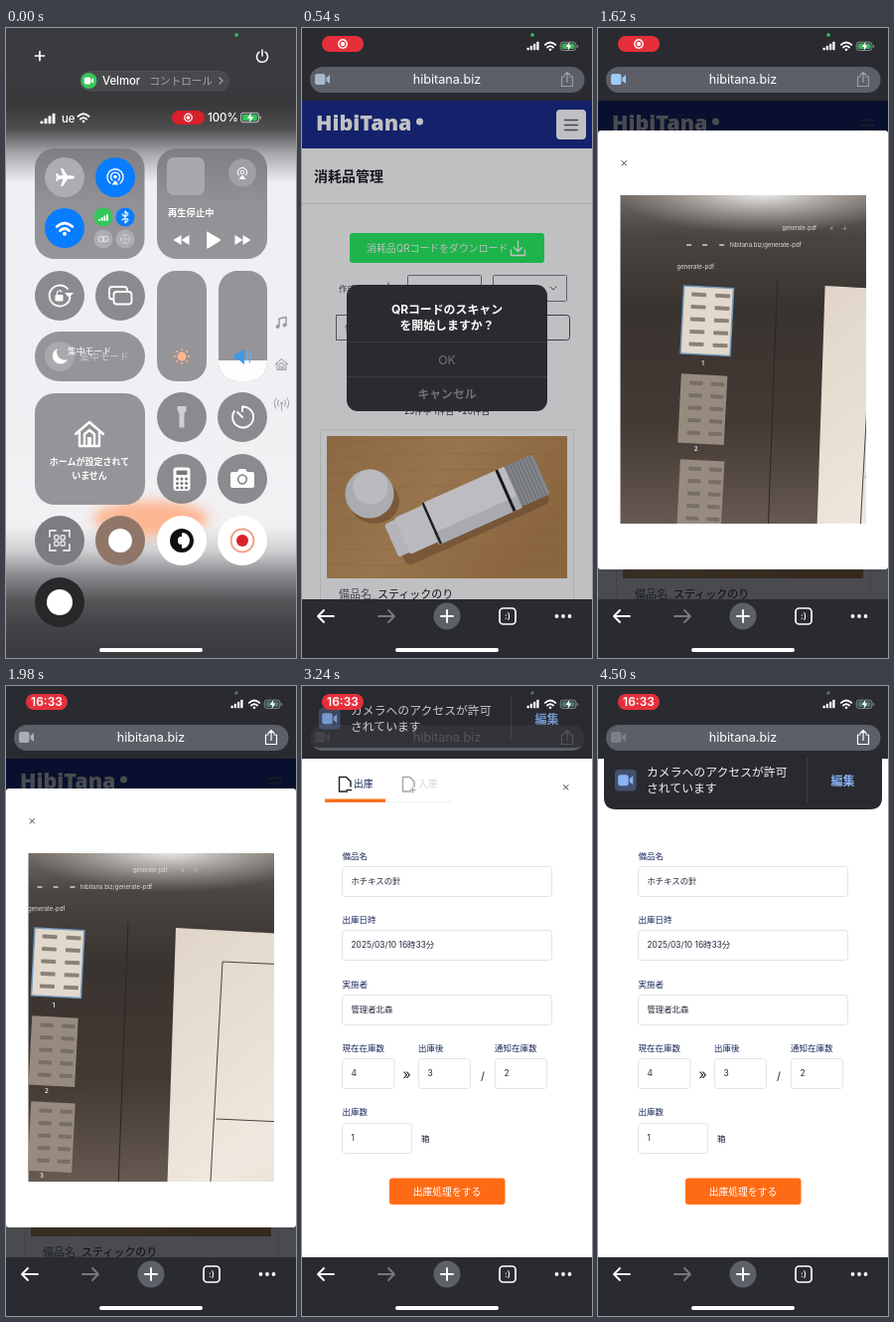
An HTML page that plays this animation: 292 by 633 pixels, repeating every 4590 ms.

```html
<!DOCTYPE html>
<html lang="ja">
<head>
<meta charset="utf-8">
<title>Stock scan demo</title>
<style>
html, body { margin: 0; width: 100%; height: 100%; overflow: hidden; background: #2a2b30; }
svg { display: block; width: 292px; height: 633px; }
text { font-family: Inter, 'Noto Sans CJK JP', 'Noto Sans CJK', sans-serif; white-space: pre; }
</style>
</head>
<body>
<svg id="stage" viewBox="0 0 292 633" xmlns="http://www.w3.org/2000/svg"></svg>
<script>
const LOOP = 4590, STEP = 90;
const BAR = '#2a2b30', NAVY = '#1c2a5e', BLUE = '#8ab4f8', INK = '#22262e';

// Markup helpers
const rect = (x, y, w, h, fill, r = 0, more = '') =>
  `<rect x="${x}" y="${y}" width="${w}" height="${h}" rx="${r}" fill="${fill}" ${more}/>`;
const box = (x, y, w, h, stroke, r = 0, fill = '#fff', sw = 1) =>
  rect(x + .5, y + .5, w - 1, h - 1, fill, r, `stroke="${stroke}" stroke-width="${sw}"`);
const disc = (x, y, r, fill, more = '') => `<circle cx="${x}" cy="${y}" r="${r}" fill="${fill}" ${more}/>`;
const ring = (x, y, r, stroke, w) => disc(x, y, r, 'none', `stroke="${stroke}" stroke-width="${w}"`);
const shape = (d, fill, more = '') => `<path d="${d}" fill="${fill}" ${more}/>`;
const line = (d, stroke, w = 1, more = '') =>
  `<path d="${d}" fill="none" stroke="${stroke}" stroke-width="${w}" stroke-linecap="round" stroke-linejoin="round" ${more}/>`;
const text = (s, x, y, size, fill, weight = 400, anchor = 'start') =>
  `<text x="${x}" y="${y}" font-size="${size}" fill="${fill}" font-weight="${weight}" text-anchor="${anchor}">${s}</text>`;
const mid = (s, x, y, size, fill, weight) => text(s, x, y, size, fill, weight, 'middle');
const group = (id, inner, more = '') => `<g id="${id}" ${more}>${inner}</g>`;
const at = (x, y, s, inner) => `<g transform="translate(${x} ${y}) scale(${s})">${inner}</g>`;
const stops = list => list.map(([o, c, a = 1]) => `<stop offset="${o}" stop-color="${c}" stop-opacity="${a}"/>`).join('');
const grad = (id, list, dir = 'x2="0" y2="1"') => `<linearGradient id="${id}" ${dir}>${stops(list)}</linearGradient>`;

// Small icons, centred on 0,0
const video = fill => rect(-7.5, -5.5, 10.5, 11, fill, 2.5) + shape('M4 -1.5L7.5 -4.5V4.5L4 1.5Z', fill);
const wifi = (c, w = 1.8) => line('M-5.2 -1.6Q0 -6.3 5.2 -1.6M-3 1Q0 -1.7 3 1', c, w) + disc(0, 3.2, 1.3, c);
const bars = c => [0, 1, 2, 3].map(i => rect(-6.5 + i * 3.5, 2.5 - i * 2.2, 2.5, 2.5 + i * 2.2, c, .7)).join('');
const bolt = shape('M1 -5L-3 .8H-.3L-1 5L3 -.8H.3Z', '#fff');
const battery = (c, edge) => rect(-9, -4.5, 17, 9, 'none', 2.5, `stroke="${edge}"`) +
  rect(-7.5, -3, 14, 6, c, 1.3) + rect(9, -1.5, 1.3, 3, edge, .6) + bolt;
const recMark = ring(0, 0, 4.2, '#fff', 1.4) + disc(0, 0, 2.2, '#fff');
const house = (c, w) => line('M-14 0L0 -12L14 0M-10 -2V12H10V-2M-5 12V0L0 -4L5 0V12', c, w) + rect(-2, 3, 4, 9, c);
const chevron = (x, y) => line(`M${x - 3} ${y - 1.5}l3 3l3 -3`, '#555b66');
const scanIcon = (c, s) => [[-1, -1], [1, -1], [-1, 1], [1, 1]]
  .map(([x, y]) => rect(x * s - s * .65, y * s - s * .65, s * 1.3, s * 1.3, 'none', 1, `stroke="${c}" stroke-width="1.5"`)).join('');

function defs() {
  return '<defs>' +
    grad('ccBack', [[0, '#3a3a3e'], [.08, '#3c3c40'], [.12, '#38383b'], [.16, '#4e4e51'], [.2, '#a9a8ac'],
      [.245, '#efeef2'], [.79, '#f1f0f3'], [.83, '#cfced1'], [.87, '#88878b'], [.91, '#555558'], [.95, '#444448'], [1, '#3a3a3e']]) +
    grad('topTile', [[0, '#7f7e82'], [.5, '#929195'], [1, '#959498']]) +
    grad('wood', [[0, '#b98a55'], [.5, '#c99a63'], [1, '#b78650']], 'x2="1" y2=".4"') +
    grad('desk', [[0, '#6e6762'], [.12, '#4a4542'], [.35, '#39332f'], [.7, '#443a34'], [1, '#665a52']]) +
    grad('paper', [[0, '#dfd4c6'], [.4, '#efe8de'], [1, '#d8ccbc']], 'x2=".6" y2="1"') +
    `<radialGradient id="glare">${stops([[0, '#fff', .9], [.45, '#e9e5e1', .5], [1, '#cfc8c2', 0]])}</radialGradient>` +
    '<filter id="soft" x="-50%" y="-100%" width="200%" height="300%"><feGaussianBlur stdDeviation="6"/></filter>' +
    '<filter id="haze"><feGaussianBlur stdDeviation=".5"/></filter>' +
    '<clipPath id="web"><rect y="73" width="292" height="501"/></clipPath>' +
    '<clipPath id="lens"><rect x="22.5" y="168" width="247.5" height="330"/></clipPath>' +
    '<clipPath id="vol"><rect x="214" y="244" width="49" height="111" rx="19"/></clipPath></defs>';
}

function photo() {
  const ribs = Array.from({ length: 8 }, (_, i) => rect(54 + i * 3.5, -22, 1, 44, '#8b8f96')).join('');
  const grain = Array.from({ length: 9 }, (_, i) =>
    line(`M25 ${418 + i * 15}Q110 ${408 + i * 17} 267 ${414 + i * 15}`, '#a97a47', .7, 'opacity=".45"')).join('');
  return rect(25, 410, 242, 143, 'url(#wood)') + grain +
    `<ellipse cx="73" cy="476" rx="25" ry="22" fill="#7d5733" opacity=".5"/>` +
    disc(68, 468, 24.5, '#e3e4e8') + disc(69, 461, 17.5, '#f8f8fa') +
    `<g transform="translate(165 482) rotate(-24)">` +
    rect(-78, 8, 158, 22, '#7d5733', 6, 'opacity=".5"') +
    rect(-82, -18, 16, 36, '#eeeff2', 3) + rect(-70, -20, 32, 40, '#f8f8fa', 2) +
    rect(-40, -22, 92, 45, '#fbfbfd', 2) + rect(-40, 10, 92, 13, '#dfe1e6') +
    rect(-39, -22, 2.5, 45, '#25272b') + rect(42, -22, 3, 45, '#1c1e22') +
    rect(52, -22, 31, 44, '#aeb1b7', 3) + ribs + '</g>';
}

function listPage() {
  const select = (x, s) => box(x, 248, 75, 27, '#7a7f89', 1) + text(s, x + 10, 265, 8.5, INK) + chevron(x + 61, 261.5);
  return rect(0, 73, 292, 501, '#fff') + rect(0, 73, 292, 48, '#182c8b') +
    `<text x="14" y="103" font-size="21.5" font-weight="800" fill="#fff" style="font-family:'Open Sans',sans-serif">HibiTana</text>` +
    disc(118.5, 94, 3.5, '#fff') + group('menu', rect(256, 82, 30, 30, '#fff', 4)) +
    line('M264.500 92.500H277.500M264.500 97.500H277.500M264.500 102.500H277.500', '#5a5d66', 1.3) +
    text('消耗品管理', 12, 154, 14, '#1b1d22', 700) + rect(0, 176, 292, 1, '#dcdde0') +
    rect(48, 206, 196, 30, '#27ee60', 3) + text('消耗品QRコードをダウンロード', 65, 225, 9.9, '#fff') +
    line('M217.500 214V224M213.500 220.500L217.500 224.500L221.500 220.500M210.500 223V228.500H224.500V223', '#fff', 1.3) +
    text('作成日降順', 37, 265, 8.5, '#444953') + line('M87 256V267.500M83.500 264L87 267.500L90.500 264', '#444953') +
    select(106, '利用場所') + select(192, '保管場所') +
    box(34, 288, 127, 26, '#6c717b') + text('備品名で検索', 43, 304.5, 9.8, '#757a84') +
    at(146.5, 301, 1, scanIcon('#33363d', 4.2)) +
    rect(160, 288, 26, 26, '#9dcdfb') + ring(172, 300, 4, '#fff', 1.2) + line('M175 303L178 306', '#fff', 1.2) +
    box(198, 288, 72, 26, '#4a5160', 3) + mid('クリア', 234, 304, 8.5, INK) +
    box(93, 339, 29, 30, '#f0f1f3', 2) + mid('« 前', 107.500, 357, 8.5, '#9a9ea6') +
    rect(126, 339, 15.500, 30, '#1d43d6', 2) + mid('1', 133.700, 357, 8.5, '#fff') +
    box(146, 339, 17, 30, '#f0f1f3', 2) + mid('2', 154.500, 357, 8.5, INK) +
    box(167, 339, 28, 30, '#f0f1f3', 2) + mid('次 »', 181, 357, 8.5, INK) +
    mid('25件中 1件目〜20件目', 146, 387.500, 8.5, INK) +
    box(18, 403, 256, 190, '#e6e7ea') + photo() +
    text('備品名', 37, 573, 11, '#5a5d66') + rect(70, 573, 6, 1, '#ccc') + text('スティックのり', 76, 573, 11, '#1b1d22');
}

function alertBox() {
  return rect(45, 258, 202, 127, BAR, 11) +
    mid('QRコードのスキャン', 146, 287, 11.9, '#fff', 700) + mid('を開始しますか？', 146, 303, 11.9, '#fff', 700) +
    rect(45, 315, 202, .7, '#42444a') + rect(45, 350, 202, .7, '#42444a') +
    group('choices', mid('OK', 146, 337.500, 12.3, 'currentColor') + mid('キャンセル', 146, 372, 11.8, 'currentColor', 700));
}

function thumb(x, y, w, h, fill, edge) {
  const rows = Array.from({ length: 10 }, (_, i) =>
    rect(x + 8 + (i % 2) * w * .48, y + 6 + (i >> 1) * 12.5, w * .3, 4, '#6d645c', 1, 'opacity=".75"')).join('');
  return `<g transform="rotate(3 ${x} ${y})">` + rect(x, y, w, h, fill, 0, `stroke="${edge}" stroke-width="1.5"`) + rows + '</g>';
}

// The filmed desk; at zero offset the sheet stands fully in view
function scene() {
  const label = (s, x, y) => `<g transform="rotate(2 ${x} ${y})">${text(s, x, y, 8.2, '#3c3a3a', 700)}</g>`;
  return shape('M70 218L470 240V760H52Z', 'url(#paper)') +
    line('M470 268L117 252L98 600M111 410L470 426', '#4a443f', 1) +
    label('管理IDCO-4538', 220, 303) + label('備品名 ホチキスの針', 219, 323) + label('カテゴリ消耗品', 218, 343) +
    label('管理IDCO-6493', 210, 457) + label('備品名 ボールペン', 208, 475) + label('カテゴリ消耗品', 207, 491) +
    line('M22 213L12 480', '#2c2521', 1) +
    thumb(-72, 218, 50, 68, '#e2d9cc', '#6f97bd') + thumb(-74, 307, 45, 68, '#978b80', '#978b80') +
    thumb(-75, 393, 43, 68, '#978b80', '#978b80') +
    `<g filter="url(#haze)">` + mid('1', -53, 298, 6, '#ddd', 700) + mid('2', -60, 384, 6, '#ddd', 700) + mid('3', -65, 469, 6, '#ddd', 700) + '</g>' +
    group('tabs', text('generate-pdf', -79, 201, 6, '#e4ddd6') + text('hibitana.biz/generate-pdf', -26, 179, 6, '#e4ddd6') +
      text('generate-pdf', 27, 162, 5.5, '#e4ddd6') + text('× 　 ＋', 75, 162, 5.5, '#d8d0c8') +
      line('M-69 177h4M-53 177h4M-36 177h4', '#d8d0c8', 1.5), 'filter="url(#haze)"');
}

function scanner() {
  return rect(0, 73, 292, 501, '#04060c', 0, 'opacity=".72"') + rect(0, 103, 292, 441, '#fff', 3) +
    line('M24 133.500l4.500 4.500m0 -4.500l-4.500 4.500', '#333', .9) +
    `<g clip-path="url(#lens)">` + rect(22, 168, 249, 330, 'url(#desk)') +
    `<ellipse cx="165" cy="165" rx="150" ry="42" fill="url(#glare)"/>` + group('scene', scene()) +
    group('crumb', text('e-pdf', 23, 178, 6, '#cfc6bd')) + '</g>';
}

function form() {
  const field = (x, y, w, s) => box(x, y, w, 31, '#e2e4ea', 3) + text(s, x + 9.500, y + 18.300, 8.4, '#23293a');
  const label = (s, x, y) => text(s, x, y, 8.5, NAVY);
  const doc = (x, c) => line(`M${x + 8} 106H${x}V91.500H${x + 7}L${x + 11.5} 96V101`, c, 1.5);
  return rect(0, 73, 292, 501, '#fff') +
    doc(37.500, '#22252c') + line('M45 104.500H49.500', '#22252c', 1.4) + text('出庫', 52, 101.500, 9.8, NAVY) +
    doc(101.500, '#a6a8ad') + line('M109 104.500H114M111.500 102V107', '#a6a8ad', 1.3) + text('入庫', 117, 101.500, 9.8, '#d5d8de') +
    rect(23, 116, 128, 1, '#eff0f3') + rect(23, 113.500, 61, 3.300, '#ff6a13') +
    line('M263.500 99.500l4.500 4.500m0 -4.500l-4.500 4.500', '#333', .9) +
    label('備品名', 40.500, 173.500) + field(40, 181, 212, 'ホチキスの針') +
    label('出庫日時', 40.500, 238) + field(40, 245, 212, '2025/03/10 16時33分') +
    label('実施者', 40.500, 302.500) + field(40, 310, 212, '管理者北森') +
    label('現在在庫数', 40.500, 367) + field(40, 374, 53.500, '4') + mid('»', 105.500, 395, 14, '#222') +
    label('出庫後', 117, 367) + field(117, 374, 53, '3') + mid('/', 182, 396, 11, '#222') +
    label('通知在庫数', 194, 367) + field(194, 374, 53, '2') +
    label('出庫数', 40.500, 431) + field(40, 439, 71, '1') + text('箱', 120, 457.500, 8.5, '#23293a') +
    rect(88, 494.500, 116.500, 26.500, '#ff6b14', 3) + mid('出庫処理をする', 146, 511.500, 9.8, '#fff');
}

function browser() {
  return rect(0, 0, 292, 73, BAR) + rect(8, 39, 276.500, 26, '#5c5f67', 13) +
    group('cam', at(20.500, 51.500, 1, video('currentColor'))) + mid('hibitana.biz', 146, 56.300, 12.6, '#fff') +
    group('share', line('M264 49H261.500V58.500H272.500V49H270M267 54.500V45M264 47.500L267 44.500L270 47.500', 'currentColor', 1.2)) +
    rect(0, 574, 292, 59, BAR) +
    line('M32 591H16M22 585L16 591L22 597', '#fff', 1.8) + line('M77 591H93M87 585L93 591L87 597', '#77797f', 1.8) +
    disc(146, 591, 13.500, '#5d6067') + line('M140 591H152M146 585V597', '#fff', 1.9) +
    rect(199, 583, 16, 16, 'none', 3.500, 'stroke="#fff" stroke-width="1.7"') + mid(':)', 207, 594, 8.5, '#fff', 600) +
    [256.500, 263, 269.500].map(x => disc(x, 591, 1.9, '#fff')).join('');
}

function banner() {
  return shape('M6 68H286V112Q286 124 274 124H18Q6 124 6 112Z', '#292a30') +
    rect(17, 84, 21.500, 21.500, '#43506e', 4) + at(27.700, 94.700, 1, video(BLUE)) +
    text('カメラへのアクセスが許可', 49, 91.300, 11.85, '#f1f1f3') + text('されています', 49, 107.300, 11.85, '#f1f1f3') +
    rect(210, 72, .7, 45, '#45474e') + mid('編集', 246.500, 99.500, 12, BLUE, 700);
}

function status() {
  return group('lamp', disc(232, 7, 1.800, 'currentColor')) + rect(20, 8, 42, 16, '#e5303b', 8) +
    group('recPill', at(41, 16, 1, recMark)) + group('clock', mid('16:33', 41, 20.400, 12, '#fff', 600)) +
    at(232.500, 17.500, .93, bars('#fff')) + at(250, 18.500, 1, wifi('#fff')) +
    group('cell', at(268.500, 18.300, .92, battery('currentColor', '#8d9096')));
}

function controls() {
  const W = '#fff', GREY = '#959498', TOP = 'url(#topTile)';
  const tile = (x, y, w, h, r, fill = GREY) => rect(x, y, w, h, fill, r);
  const knob = (x, y, fill = '#8b8a8e') => disc(x, y, 25, fill);
  const skip = x => shape(`M${x} 213l8 -5v10zM${x + 8} 213l8 -5v10z`, W);
  const rays = Array.from({ length: 8 }, (_, i) => {
    const a = i * Math.PI / 4;
    return disc(177 + 7 * Math.cos(a), 330 + 7 * Math.sin(a), 1, '#ffb488');
  }).join('');
  const keys = Array.from({ length: 9 }, (_, i) => disc(172.500 + (i % 3) * 4.500, 453 + (i / 3 | 0) * 4.500, 1.500, '#77767a')).join('');
  return rect(0, 0, 292, 633, 'url(#ccBack)') +
    `<ellipse cx="146" cy="493" rx="58" ry="18" fill="#ffb088" opacity=".9" filter="url(#soft)"/>` +
    disc(232, 7, 1.800, '#34c759') + line('M29.500 28H38.500M34 23.500V32.500', W, 1.7) +
    line('M255 24.200A5.500 5.500 0 1 0 261 24.200M258 22V28', W, 1.5) +
    rect(74.500, 43.500, 150, 19.500, '#49494d', 9.800, 'stroke="#58585c" stroke-width=".7"') + disc(83.500, 53, 8, '#34c759') +
    at(83.500, 53, .62, video(W)) + text('Velmor', 97, 57, 11.3, W, 500) + text('コントロール', 144.500, 57, 10.6, '#a4a4a8') +
    line('M215 50l3 3l-3 3', '#a4a4a8', 1.3) +
    at(42, 90.500, 1.150, bars(W)) + text('ue', 56, 94.500, 11.4, W, 500) + at(78, 90.500, 1.050, wifi(W)) +
    rect(167, 83, 33, 14, '#d8202b', 7) + at(183.500, 90, .9, recMark) + text('100%', 203, 94, 11.4, W, 500) + at(246, 90, 1.050, battery('#34c759', '#bbb')) +
    // connectivity
    tile(29, 121, 110.500, 111, 20, TOP) + disc(59, 150, 20, '#aeadb1') +
    shape('M69 150Q69 148.300 66 148.300H62L57 141H55L57.500 148.300H53.500L51.500 146H50L51 150L50 154H51.500L53.500 151.700H57.500L55 159H57L62 151.700H66Q69 151.700 69 150Z', W) +
    disc(110, 150, 20, '#087dff') + line('M107 153A4.500 4.500 0 1 1 113 153M105 156A8 8 0 1 1 115 156', W, 1.3) +
    disc(110, 149.500, 1.800, W) + shape('M110 153l3.500 4.500h-7z', W) +
    disc(59, 201, 20, '#087dff') + at(59, 202, 1.500, wifi(W)) +
    disc(98, 190, 9.500, '#34c759') + at(98, 190, .75, bars(W)) + disc(120, 190, 9.500, '#087dff') +
    line('M117 187l6 6l-3 3v-12l3 3l-6 6', W, 1.1) + disc(98, 212, 9.500, '#aeadb1') + disc(120, 212, 9.500, '#aeadb1') +
    ring(96, 212, 2.700, '#dddce0', 1.1) + ring(100, 212, 2.700, '#dddce0', 1.1) + ring(120, 212, 4.500, '#cfced2', 1) + line('M120 207.500V217M115.500 212H124.500', '#cfced2', .8) +
    // media
    tile(152, 121, 111, 111, 20, TOP) + rect(162, 130, 38, 38, '#a9a8ac', 7) + disc(238, 145.500, 14, '#a09fa3') +
    line('M234.500 148A4.500 4.500 0 1 1 241.500 148', W, 1.1) + ring(238, 145, 1.800, W, 1) + shape('M238 147.500l3.500 4.500h-7z', W) +
    text('再生停止中', 163, 189, 9.3, W, 600) + skip(168.500) + shape('M202 205.500Q201.500 204 203.500 205L215.500 212Q216.500 213 215.500 214L203.500 221.500Q201.500 222 202 220Z', W) +
    shape('M230.500 208l8 5l-8 5zM238.500 208l8 5l-8 5z', W) +
    // toggles and sliders
    knob(54, 269) + line('M62 262A10.500 10.500 0 1 0 64.500 271', W, 1.8) + shape('M59 266h9l-4.500 5z', W) + rect(49.500, 268, 8, 6.500, W, 1) + line('M51.500 268V266A2.500 2.500 0 0 1 56 265', W, 1.2) +
    knob(115, 269) + rect(104, 260, 18, 12.500, 'none', 3, `stroke="${W}" stroke-width="1.8"`) + rect(108.500, 265, 18, 12.500, '#8b8a8e', 3, `stroke="${W}" stroke-width="1.8"`) +
    tile(152, 244, 50, 111, 19) + disc(177, 330, 4.500, '#ffb488') + rays +
    tile(214, 244, 49, 111, 19) + rect(214, 334, 49, 22, '#fdfdfe', 0, 'clip-path="url(#vol)"') +
    shape('M230 327h4l6 -5v16l-6 -5h-4z', '#3a9bea') + line('M242.500 326.500Q244.500 330 242.500 333.500M245 324Q248 330 245 336', '#62aeee', 1.3) +
    tile(29, 305, 111, 50, 25) + disc(54, 330, 15, '#a9a8ac') + shape('M52 322A8 8 0 1 0 62 333A8 8 0 0 1 52 322Z', W) +
    text('集中モード', 74, 334, 10, '#c7c6ca') + text('集中モード', 62, 328, 8.8, W) +
    tile(29, 367, 111, 112, 20) + at(84, 408, 1, house(W, 2.4)) + mid('ホームが設定されて', 84, 439, 9, W, 600) + mid('いません', 84, 453, 9, W, 600) +
    // round buttons
    knob(177, 391) + shape('M172.500 380h9v4l-2 3.500v14h-5v-14l-2 -3.500z', '#d0cfd3') +
    knob(238, 391) + line('M238 381V385M238 380.500A10.500 10.500 0 1 1 230 385M233 386L238 391', W, 1.9) +
    knob(177, 453) + rect(168.500, 441.500, 17, 23.500, W, 3) + rect(171.500, 444.500, 11, 4.500, '#77767a', 1) + keys +
    knob(238, 453) + shape('M228 446h5l2 -3h6l2 3h5q2 0 2 2v12q0 2 -2 2h-20q-2 0 -2 -2v-12q0 -2 2 -2z', W) + ring(238, 453.500, 4.300, '#8b8a8e', 1.7) +
    knob(54, 515, '#7d7c80') + line('M44 511V505H50M58 505H64V511M64 519V525H58M50 525H44V519', '#e4e3e6', 1.8) + at(54, 515, 1, scanIcon('#e4e3e6', 3.2)) +
    knob(115, 515, '#8f7668') + disc(115, 515, 12, W) +
    knob(177, 515, W) + disc(177, 515, 12, '#101012') + shape('M177 507A8 8 0 0 1 177 523V519A4 4 0 0 1 177 511Z', W) + line('M177 508A7.500 7.500 0 0 0 177 522', '#101012', 1) + shape('M177 511A4 4 0 0 0 177 519Z', W) +
    knob(238, 515, W) + ring(238, 515, 11.500, '#f2a48d', 2) + disc(238, 515, 6, '#d8202b') +
    knob(54, 577, '#28282b') + disc(54, 577, 13, W) +
    // page marks
    line('M275 300V292L282 290.500V298.500', '#9a999d', 1.5) + disc(273.500, 300, 1.900, '#9a999d') + disc(280.500, 298.500, 1.900, '#9a999d') +
    at(277.500, 338, .45, house('#a9a8ac', 2.6)) + disc(277.500, 377, 1.500, '#a9a8ac') +
    line('M277.500 378V384M274.500 374Q272.500 377 274.500 380M280.500 374Q282.500 377 280.500 380M272 372Q268.500 377 272 382M283 372Q286.500 377 283 382', '#a9a8ac', 1.1);
}

document.getElementById('stage').innerHTML = defs() + browser() +
  `<g clip-path="url(#web)">` + group('list', listPage()) +
  group('dim', rect(0, 73, 292, 501, '#06060c', 0, 'opacity=".25"')) +
  group('scanner', scanner()) + group('form', form()) + '</g>' +
  group('alert', alertBox()) + group('banner', banner()) + status() + group('controls', controls()) +
  rect(94, 623, 104, 4, '#fff', 2);

const el = id => document.getElementById(id);
const fade = (id, a) => {
  el(id).style.opacity = a;
  el(id).style.display = a > 0 ? '' : 'none';
};
const tint = (id, c) => { el(id).style.color = c; };
const move = (id, x, y) => el(id).setAttribute('transform', `translate(${x} ${y})`);

// Piecewise linear value over [time, value] keys
function track(t, keys) {
  if (t <= keys[0][0]) return keys[0][1];
  for (let i = 1; i < keys.length; i++) {
    const [a, u] = keys[i - 1], [b, v] = keys[i];
    if (t <= b) return u + (v - u) * (t - a) / (b - a);
  }
  return keys[keys.length - 1][1];
}

function draw(t) {
  const live = t >= 1800, ready = t >= 720;
  fade('controls', track(t, [[0, 1], [360, 0]]));
  const ask = track(t, [[360, 0], [540, 1], [1080, 1], [1260, 0]]);
  fade('dim', ask);
  fade('alert', ask);
  tint('choices', ready ? BLUE : '#6f7177');
  const scan = t >= 2610 ? 0 : track(t, [[1350, 0], [1620, 1]]);
  fade('scanner', scan);
  fade('menu', 1 - scan);
  move('scene', track(t, [[1530, 173], [1980, 101], [2430, 0], [2610, -3]]),
    track(t, [[1530, 45], [1980, 25], [2430, 0], [2610, -2]]));
  const near = track(t, [[2250, 0], [2430, 1]]);
  fade('crumb', near);
  fade('tabs', 1 - near);
  fade('form', t >= 2610 ? 1 : 0);
  fade('recPill', live ? 0 : 1);
  fade('clock', live ? 1 : 0);
  tint('lamp', live ? '#4f6f66' : '#34c759');
  tint('cell', live ? '#4d7565' : '#3fae5c');
  tint('share', live ? '#fff' : '#9b9da3');
  tint('cam', t >= 3420 ? '#7c7f87' : live ? '#a9aeb7' : t >= 1170 ? '#9dcbf8' : '#a9b8cc');
  fade('banner', track(t, [[3060, 0], [3240, .8], [3420, 1]]));
  move('banner', 0, track(t, [[3060, -124], [3240, -62], [3330, -26], [3420, -8], [3600, 0]]));
}

function tick() {
  const t = performance.now() % LOOP;
  draw(Math.floor(t / STEP) * STEP);
  requestAnimationFrame(tick);
}
tick();
</script>
</body>
</html>
```
